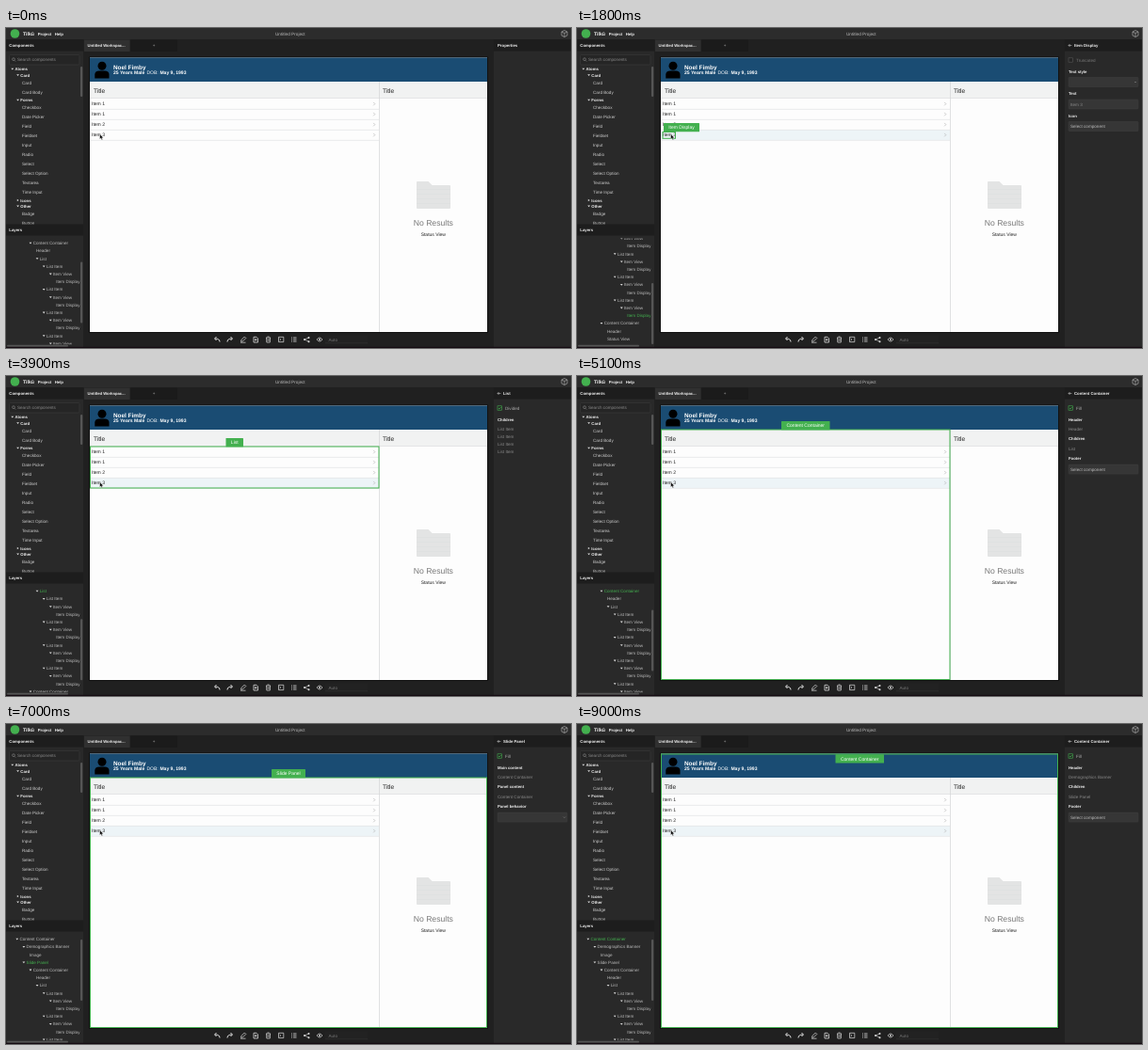
Animation, 600 px wide and 340 px high, one loop 9.1 s. Source, as an HTML page:

```html
<!DOCTYPE html>
<html lang="en">
<head>
<meta charset="utf-8">
<title>Workspace editor</title>
<style>
html, body { margin: 0; width: 100%; height: 100%; overflow: hidden; background: #1f1f1f; }
svg { display: block; width: 600px; height: 340px; font-family: "Liberation Sans", Arial, sans-serif; text-rendering: geometricPrecision; }
</style>
</head>
<body>
<svg id="stage" viewBox="0 0 600 340"></svg>
<script>
const LOOP = 9100, GREEN = '#43b04f', ROW = 8.2;

// Property prefixes: ? unchecked, ! checked, # heading, - entry, = select, ~ input
const states = [
  { at: 0, scroll: 32.8, props: [] },
  { at: 600, row: 18, scroll: 70.6, title: 'Item Display', box: [91, 110.5, 13.5, 6.8], tag: [92, 101, 38],
    props: ['?Truncated', '#Text style', '=', '#Text', '~Item 3', '#Icon', '=Select component'] },
  { at: 2200, row: 17, scroll: 70.6, title: 'Item View', box: [89.5, 108.5, 296, 10], tag: [221, 99.5, 32.5],
    props: ['?Is truncated', '#Layout', '=', '#Text emphasis', '=', '#Accessory alignment', '=',
      '#Start accessory', '=Select component', '#End accessory', '=Select component',
      '#Displays', '-Item Display', '#Comment', '=Select component'] },
  { at: 3000, row: 16, scroll: 70.6, title: 'List Item', box: [89.5, 108.5, 306.5, 10.5], tag: [228, 99.5, 29],
    props: ['!Chevron', '?Selected', '#Content', '-Item View'] },
  { at: 3800, row: 6, scroll: 49.2, title: 'List', box: [89.5, 75, 306.5, 44], tag: [233.5, 66, 18.5],
    props: ['!Divided', '#Children', '-List Item', '-List Item', '-List Item', '-List Item'] },
  { at: 5000, row: 4, scroll: 32.8, title: 'Content Container', box: [89.5, 57, 306.5, 265.5], tag: [217, 48, 51.5],
    props: ['!Fill', '#Header', '-Header', '#Children', '-List', '#Footer', '=Select component'] },
  { at: 6400, row: 3, scroll: 0, title: 'Slide Panel', box: [89.5, 57, 421, 265.5], tag: [282, 48, 36],
    props: ['!Fill', '#Main content', '-Content Container', '#Panel content', '-Content Container', '#Panel behavior', '='] },
  { at: 7200, row: 0, scroll: 0, title: 'Content Container', box: [89.5, 32, 421, 290.5], tag: [274.5, 32.3, 51.5],
    props: ['!Fill', '#Header', '-Demographics Banner', '#Children', '-Slide Panel', '#Footer', '=Select component'] }
];

// [depth, label, leaf]
const listItem = [[4, 'List Item'], [5, 'Item View'], [5, 'Item Display', 1]];
const layers = [
  [0, 'Content Container'], [1, 'Demographics Banner'], [1, 'Image', 1], [1, 'Slide Panel'],
  [2, 'Content Container'], [2, 'Header', 1], [3, 'List'],
  ...listItem, ...listItem, ...listItem, ...listItem,
  [2, 'Content Container'], [2, 'Header', 1], [2, 'Status View', 1]
];

const rect = (x, y, w, h, fill, more = '') =>
  `<rect x="${x}" y="${y}" width="${w}" height="${h}" fill="${fill}" ${more}/>`;
const path = (d, stroke, width = .7, fill = 'none') =>
  `<path d="${d}" stroke="${stroke}" stroke-width="${width}" fill="${fill}"/>`;
// y is the vertical middle of the line
const text = (x, y, s, fill = '#ccc', size = 4.6, more = '') =>
  `<text x="${x}" y="${y + size * .35}" fill="${fill}" font-size="${size}" ${more}>${s}</text>`;
const bold = (x, y, s, fill = '#eee', size = 4.3) => text(x, y, s, fill, size, 'font-weight="700"');
const middle = (x, y, s, fill, size) => text(x, y, s, fill, size, 'text-anchor="middle"');
const arrow = (x, y, closed) => closed
  ? path(`M${x - .8} ${y - 1.3}v2.6l1.8-1.3z`, 'none', 0, '#ddd')
  : path(`M${x - 1.4} ${y - .8}h2.8l-1.4 1.8z`, 'none', 0, '#ddd');

function header() {
  return rect(0, 0, 600, 12, '#2c2c2c') +
    `<circle cx="9.5" cy="6" r="4.8" fill="${GREEN}"/>` +
    bold(18, 6, 'Tilkū', '#f2f2f2', 5.2) + bold(33.7, 6, 'Project') + bold(51.7, 6, 'Help') +
    middle(301.8, 6, 'Untitled Project', '#bbb', 4.7) +
    path('M590 4l3-1.5 3 1.5v4l-3 1.5-3-1.5zl3 1.5 3-1.5M593 5.5v4', '#bbb', .6) +
    rect(83, 12.5, 48.5, 12.5, '#303030') + rect(132, 12.5, 50, 12.5, '#1b1b1b') +
    bold(86.5, 18.5, 'Untitled Workspac...', '#eee', 4.2) + middle(157, 18.3, '+', '#aaa', 4.6);
}

function components() {
  const group = (x, y, s, closed) => arrow(x - 2.7, y, closed) + bold(x, y, s);
  const forms = ['Checkbox', 'Date Picker', 'Field', 'Fieldset', 'Input', 'Radio', 'Select', 'Select Option', 'Textarea', 'Time Input'];
  return rect(0, 12, 82, 328, '#292929') + rect(0, 12, 82, 12.5, '#1d1d1d') + bold(3.3, 18.5, 'Components') +
    rect(3.5, 28.5, 74.5, 10.5, '#252525', 'rx="1" stroke="#3c3c3c" stroke-width=".6"') +
    '<circle cx="8" cy="33.2" r="1.4" stroke="#999" stroke-width=".5" fill="none"/>' + path('M9 34.3l1.2 1.3', '#999', .5) +
    text(12, 33.8, 'Search components', '#888') +
    group(9.5, 43.5, 'Atoms') + group(15.3, 50, 'Card') + text(17, 58.3, 'Card') + text(17, 68.2, 'Card Body') +
    group(15.3, 76.5, 'Forms') + forms.map((s, i) => text(17, 84.6 + i * 10, s)).join('') +
    group(15.3, 183, 'Icons', true) + group(15.3, 189.2, 'Other') + text(17, 197.6, 'Badge') + text(17, 207.5, 'Button') +
    rect(79, 41, 2.3, 32, '#555', 'rx="1"') +
    rect(0, 208.5, 82, 12, '#1d1d1d') + bold(3.3, 214.5, 'Layers');
}

function layerTree({ row, scroll }) {
  const rows = layers.map(([depth, label, leaf], i) => {
    const x = 14.5 + depth * 7.1 + (leaf ? 3.2 : 0), y = 228.6 + i * ROW - scroll;
    return (leaf ? '' : arrow(x - 2.7, y)) + text(x, y, label, i === row ? GREEN : '#bbb');
  });
  return `<clipPath id="tree"><rect y="223.5" width="78.5" height="112.8"/></clipPath><g clip-path="url(#tree)">${rows.join('')}</g>` +
    rect(79, 229 + scroll * .595, 2.3, 65, '#555', 'rx="1"') + rect(1, 336.7, 65, 2, '#555', 'rx="1"');
}

function preview(selected) {
  let out = rect(88, 30.5, 424, 293.5, '#111') + rect(89, 31.5, 422, 291.5, '#fdfdfd') + rect(89, 31.5, 422, 25.5, '#1a4c73') +
    '<circle cx="102" cy="40.3" r="4.5"/><path d="M94.3 53.5v-4q0-4 5-4h5.2q5 0 5 4v4z"/>' +
    bold(114, 42, 'Noel Fimby', '#fff', 6.4) + bold(114, 47.7, '25 Years Male', '#fff', 5.1) +
    text(149.5, 47.7, 'DOB:', '#fff', 5) + bold(163.4, 47.7, 'May 9, 1993', '#fff', 5.05) +
    rect(89, 57, 422, 17.3, '#f1f2f2') + rect(89, 74.2, 422, .6, '#d6d8d9');
  if (selected) out += rect(89, 108.4, 307, 10.6, '#edf4f7');
  out += ['Item 1', 'Item 1', 'Item 2', 'Item 3'].map((s, i) => {
    const y = 80.6 + i * 11;
    return text(91, y, s, '#222', 5.05) + path(`M390.2 ${y - 1.7}l1.6 1.7-1.6 1.7`, '#aaa', .6) + rect(89, y + 5.3, 307, .6, '#dcdedf');
  }).join('');
  return out + rect(396.2, 57, .7, 266, '#d3d5d6') + text(93, 66.2, 'Title', '#222', 6.6) + text(400, 66.2, 'Title', '#222', 6.6) +
    path('M436 164q0-1 1-1h11.5l4 4H471q1 0 1 1v23q0 1-1 1h-34q-1 0-1-1z', 'none', 0, '#e3e4e4') +
    path('M436 171.5h36M436 176.5h36M436 181.5h36M436 186.5h36', '#dadbdb', .4) +
    middle(453.8, 207, 'No Results', '#777', 8.6) + middle(453.8, 219.3, 'Status View', '#222', 5);
}

function toolbar() {
  const ink = '#ddd';
  return path('M227 333.5q0-3.5-5-3.5M223.5 328l-2 2 2 2M235 333.5q0-3.5 5-3.5M238.500 328l2 2-2 2', ink, 1) +
    path('M249.500 333.300l.5-2 3.300-3.300 1.500 1.500-3.300 3.300zM249 334.200h5.500', ink) +
    path('M263 328.300h3l1.500 1.500v4.200H263zM265.200 330v2.500M264 331.200h2.500', ink, .8) +
    path('M276 329h5M277.500 328h2M276.500 329l.3 5h3.500l.3-5M278 330.500v2M279.200 330.500v2', ink) +
    path('M289.500 328.300h5.300v5.300h-5.300zM290.700 330l1.200 1-1.200 1', ink) +
    path('M303 329h1M305 329h3.500M303 331h1M305 331h3.500M303 333h1M305 333h3.500', ink, .8) +
    path('M321.500 329l-4.500 2 4.500 2.200', ink, .6) +
    [[321.5, 329], [317, 331], [321.5, 333.2]].map(([x, y]) => `<circle cx="${x}" cy="${y}" r="1" fill="${ink}"/>`).join('') +
    path('M330 331q3-4 6 0q-3 4-6 0', ink) + `<circle cx="333" cy="331" r=".9" fill="${ink}"/>` +
    rect(339, 326.5, 45, 8.5, '#222') + rect(339, 334.7, 45, .4, '#3a3a3a') + text(342.5, 331, 'Auto', '#777');
}

function properties({ title, props }) {
  let out = rect(518, 12, 82, 328, '#292929') + rect(518, 12, 82, 12.5, '#1d1d1d');
  if (!title) return out + bold(522, 18.5, 'Properties');
  out += path('M525.300 18.500h-3.300M523.500 17l-1.500 1.500 1.500 1.500', '#ccc', .6) + bold(528, 18.5, title);
  let y = 22, previous = '?';
  for (const prop of props) {
    const kind = prop[0], label = prop.slice(1);
    if (kind === '?' || kind === '!') {
      const on = kind === '!';
      y += 12;
      out += rect(522, y - 2.2, 4.4, 4.4, '#252525', `stroke="${on ? GREEN : '#555'}" stroke-width=".6"`) +
        (on ? path(`M523 ${y}l1 1.100 1.700-2.200`, GREEN) : '') + text(530, y, label, on ? '#aaa' : '#777');
    } else if (kind === '#') {
      y += previous === '-' ? 10.4 : 12;
      out += bold(522, y, label);
    } else if (kind === '-') {
      y += previous === '-' ? 8.1 : 10.4;
      out += text(522, y, label, '#888');
    } else {
      y += 11.5;
      out += rect(522, y - 5, 74, 10, '#363636', 'rx=".8" stroke="#444" stroke-width=".4"') +
        text(524, y, label, kind === '~' ? '#888' : '#bbb') +
        (label ? '' : path(`M592 ${y - .5}l1 1 1-1`, '#999', .5));
    }
    previous = kind;
  }
  return out;
}

function selection({ box, tag, title }) {
  if (!box) return '';
  const [x, y, w] = tag;
  return rect(...box, 'none', `stroke="${GREEN}" stroke-width="1"`) +
    rect(x, y, w, 9.3, GREEN, 'rx=".6"') + middle(x + w / 2, y + 4.7, title, '#fff', 5);
}

const stage = document.getElementById('stage');
const pointer = path('M99.600 112.800v5.300l1.200-1.100.9 2 .9-.4-.9-1.900h1.700z', '#fff', .4, '#000');
let shown;

function frame() {
  const t = performance.now() % LOOP;
  const state = states.findLast(s => s.at <= t);
  if (state !== shown) {
    shown = state;
    stage.innerHTML = rect(0, 0, 600, 340, '#202020') + header() + components() + layerTree(state) +
      preview(state.box) + toolbar() + properties(state) + rect(0, 338.8, 600, 1.2, '#150b12') + selection(state) + pointer;
  }
  requestAnimationFrame(frame);
}
frame();
</script>
</body>
</html>
```
